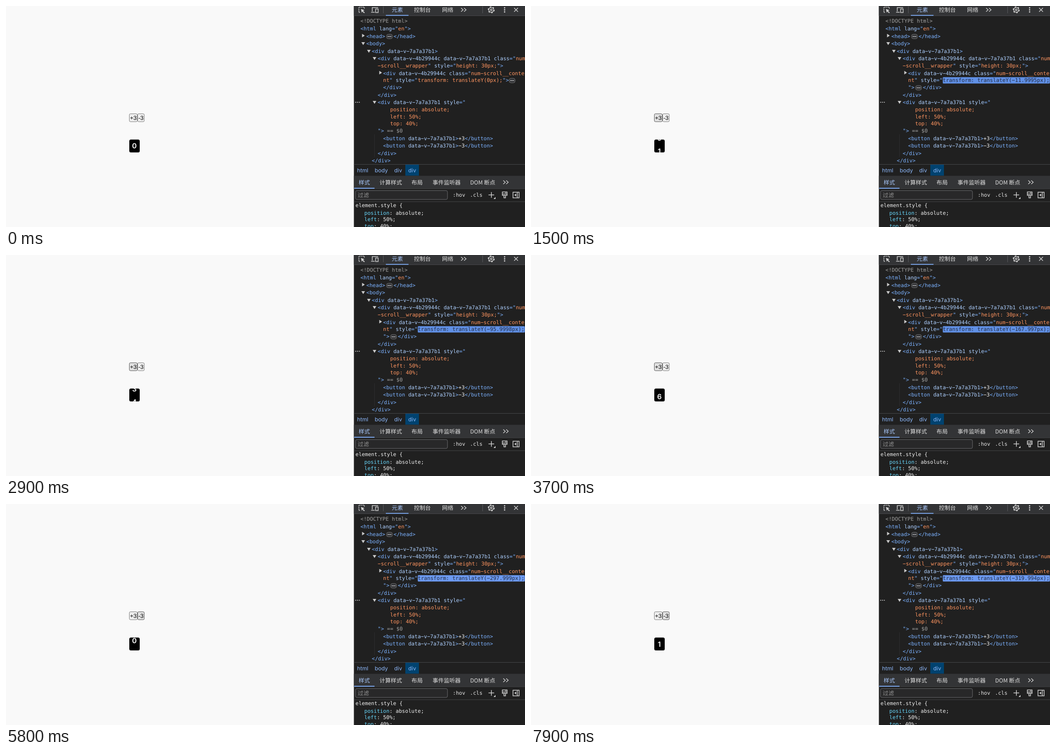
Animation, 1145 px wide and 489 px high, one loop 8 s. Source, as an HTML page:

```html
<!DOCTYPE html>
<html lang="en">
<head>
<meta charset="utf-8">
<title>Number scroll</title>
<style>
html, body { margin: 0; width: 100%; height: 100%; overflow: hidden; background: #f9f9f9; }
svg { display: block; width: 1145px; height: 489px; }
text { white-space: pre; text-rendering: geometricPrecision; }
.mono { font: 11.51px "DejaVu Sans Mono", monospace; }
.cjk { font: 12.4px "Noto Sans CJK SC", "Noto Sans CJK", sans-serif; }
.ui { font: 12.2px Inter, sans-serif; }
.btn { font: 12.9px "Liberation Sans", Arial, sans-serif; text-anchor: middle; }
.num { font: 600 15.8px Inter, sans-serif; text-anchor: middle; fill: #fff; }
</style>
</head>
<body>
<svg id="stage" viewBox="0 0 1145 489" xmlns="http://www.w3.org/2000/svg">
  <defs><clipPath id="clip"><rect x="272" y="295.5" width="23" height="28.6" rx="3.5"/></clipPath></defs>
</svg>
<script>
const stage = document.getElementById("stage");
const COLORS = { t: "#7cb2ff", a: "#aed0ff", v: "#ff9560", w: "#f0f0f0", g: "#a2a2a2", c: "#68d6fa" };
const CHAR = 6.93;

function el(name, attrs = {}, parent = stage) {
  const node = document.createElementNS("http://www.w3.org/2000/svg", name);
  set(node, attrs);
  parent.appendChild(node);
  return node;
}
function set(node, attrs) {
  for (const key in attrs) node.setAttribute(key, attrs[key]);
}
const rect = (x, y, width, height, fill, more) => el("rect", { x, y, width, height, fill, ...more });
const path = (d, stroke = "#d0d0d0", more) =>
  el("path", { d, stroke, fill: "none", "stroke-width": 1.5, ...more });
function label(x, y, str, cls, fill, more) {
  const node = el("text", { x, y, class: cls, fill, ...more });
  node.textContent = str;
  return node;
}
// Coloured code line: "{t<div }{aname}" where the first letter picks the colour; hyphens are drawn wide
function code(x, y, src) {
  const node = el("text", { x, y: y + 4, class: "mono" });
  for (const [, key, str] of src.matchAll(/\{(\w)([^}]*)\}/g))
    el("tspan", { fill: COLORS[key] }, node).textContent = str.replace(/-/g, "−");
  return node;
}
function badge(x, y) {
  const g = el("g", { transform: `translate(${x} ${y})` });
  el("rect", { x: -6.5, y: -4.5, width: 13, height: 10, rx: 4, fill: "#303134", stroke: "#8a8a8a", "stroke-width": .8 }, g);
  for (const dx of [-3, 0, 3]) el("circle", { cx: dx, cy: .5, r: 1.1, fill: "#e3e3e3" }, g);
  return g;
}
const arrow = (x, y, open) =>
  path(open ? `M${x - 4} ${y - 3}h8l-4 6.5z` : `M${x - 2.5} ${y - 4.5}v8l6-4z`, "none", { fill: "#c8c8c8" });
const chevrons = (x, y) => path(`M${x - 6} ${y - 4}l4.5 4-4.5 4m6.5-8l4.5 4-4.5 4`);

// Page: buttons and number box
function button(x, w, str) {
  const box = rect(x + .5, 238.5, w - 1, 17.5, "#efefef", { rx: 2.3, stroke: "#767676" });
  label(x + w / 2, 251.7, str, "btn", "#000");
  return box;
}
const plus = button(271.7, 18.3, "+3");
const minus = button(290, 15.5, "-3");
rect(272, 295.5, 23, 28.6, "#000", { rx: 3.5 });
const reel = el("g", {}, el("g", { "clip-path": "url(#clip)" }));
const PITCH = 28.5;
for (let i = 0; i < 20; i++)
  el("text", { x: 283.2, y: 315.3 + i * PITCH, class: "num" }, reel).textContent = i % 10;

// Developer panel
rect(767.5, 0, 378, 489, "#202020");
rect(767.5, 0, 378, 21, "#333436");
rect(767.5, 21, 378, 1, "#47484b");
path("M781 14h-2.5v-11.5h12v4", "#d0d0d0", { "stroke-dasharray": "2.6 1.2" });
path("M783 6.5l8 2.8-3.2 1.5 3.7 3.7-1.5 1.5-3.7-3.7-1.4 2.8z", "none", { fill: "#d0d0d0" });
path("M808 12V3.5h13M805.5 13.7h8M815.5 6.5h5.5v8h-5.5z");
rect(832, 1, 1, 15, "#5a5b5e");
rect(1051, 1, 1, 15, "#5a5b5e");
label(851, 12.7, "元素", "cjk", "#a8c7fa");
label(900, 12.7, "控制台", "cjk", "#e0e0e0");
label(962, 12.7, "网络", "cjk", "#e0e0e0");
rect(838, 19.8, 50, 1.8, "#7cacf8");
chevrons(1010, 8.5);
el("circle", { cx: 1070.5, cy: 8.5, r: 6.6, fill: "none", stroke: "#d0d0d0", "stroke-width": 2, "stroke-dasharray": "3.4 3.5" });
el("circle", { cx: 1070.5, cy: 8.5, r: 5.4, fill: "none", stroke: "#d0d0d0", "stroke-width": 1.4 });
el("circle", { cx: 1070.5, cy: 8.5, r: 2, fill: "none", stroke: "#d0d0d0", "stroke-width": 1.4 });
for (const y of [4, 8.5, 13]) el("circle", { cx: 1100, cy: y, r: 1.5, fill: "#e0e0e0" });
path("M1121 4.3l8.5 8.5m0-8.5l-8.5 8.5");

code(782, 33, "{g<!DOCTYPE html>}");
code(782, 50, "{t<html }{alang}{t=\"}{ven}{t\">}");
arrow(788, 66);
code(795, 66.5, "{t<head>}");
badge(846, 67);
code(855, 66.5, "{t</head>}");
arrow(788, 83, true);
code(795, 83, "{t<body>}");
arrow(800.5, 100, true);
code(807, 100, "{t<div }{adata-v-7a7a37b1}{t>}");
arrow(813, 116, true);
code(820, 116, "{t<div }{adata-v-4b29944c data-v-7a7a37b1 class}{t=\"}{vnum}");
code(820, 132, "{v-scroll__wrapper}{t\" }{astyle}{t=\"}{vheight: 30px;}{t\">}");
arrow(826, 148);
code(832, 148.5, "{t<div }{adata-v-4b29944c class}{t=\"}{vnum-scroll__conte}");
code(832, 164, "{vnt}{t\" }{astyle}{t=\"}");
const flash = rect(908.5, 157.5, 10, 14, "#6092e8", { rx: 1.5 });
const value = label(908.5, 168, "", "mono", COLORS.v);
const quote = code(0, 164, "{t\">}");
const dots = badge(0, 0);
const close = code(832, 180, "{t</div>}");
code(820, 196.5, "{t</div>}");
for (const x of [771.5, 775.5, 779.5]) el("circle", { cx: x, cy: 213, r: 1.1, fill: "#d5d5d5" });
arrow(813, 213, true);
code(820, 213, "{t<div }{adata-v-7a7a37b1 style}{t=\"}");
code(847.5, 229, "{vposition: absolute;}");
code(847.5, 244.5, "{vleft: 50%;}");
code(847.5, 260, "{vtop: 40%;}");
code(820, 276, "{t\">}");
set(code(840.5, 276, "{g== $0}"), { "font-style": "italic" });
rect(812.5, 284, 1, 50, "#2e2f31");
code(832, 292.5, "{t<button }{adata-v-7a7a37b1}{t>}{w+3}{t</button>}");
code(832, 309, "{t<button }{adata-v-7a7a37b1}{t>}{w-3}{t</button>}");
code(820, 325.5, "{t</div>}");
code(807, 342, "{t</div>}");

rect(767.5, 350, 378, 1, "#47484b");
rect(881, 351, 30, 24.5, "#00426f");
for (const [x, str] of [[774.5, "html"], [813.5, "body"], [856.5, "div"], [887.5, "div"]])
  label(x, 367.5, str, "ui", "#8db8fa");
rect(767.5, 375.7, 378, 28, "#333436");
rect(767.5, 403.7, 378, 1, "#47484b");
for (const [x, str, fill] of [[778, "样式", "#a8c7fa"], [824, "计算样式"], [894.5, "布局"], [941, "事件监听器"], [1024, "DOM 断点"]])
  label(x, 394.5, str, "cjk", fill || "#e0e0e0");
rect(768, 402.3, 45, 1.9, "#7cacf8");
chevrons(1103, 390);
rect(771, 408.5, 203, 19.5, "#282829", { rx: 3, stroke: "#6c6d70" });
label(776, 422.5, "过滤", "cjk", "#959595");
label(985.5, 422, ":hov", "mono", "#e4e4e4", { "font-weight": "bold" });
label(1023.5, 422, ".cls", "mono", "#e4e4e4", { "font-weight": "bold" });
path("M1064.5 418h12.5m-6.2-6.2v12.5");
path("M1080 422.5v4.5h-4.5z", "none", { fill: "#d0d0d0" });
path("M1095 411.5h10.5v7.5h-10.5zM1095 416h10.5M1098.5 419.5v5h3.5v-5M1102.5 411.5v3");
path("M1118.5 412h13.5v12.5h-13.5zM1128 412v12.5");
path("M1125.5 415v6.5l-4-3.2z", "none", { fill: "#d0d0d0" });
rect(767.5, 432.5, 378, 1, "#47484b");
code(771, 441, "{welement.style {}");
code(790.5, 458, "{cposition}{w: absolute;}");
code(790.5, 472, "{cleft}{w: 50%;}");
code(790.5, 486.5, "{ctop}{w: 40%;}");

// Each run scrolls for one second in 30 steps; the panel shows every eighth step
const LOOP = 8000, SPAN = 1000, STEPS = 30, EVERY = 8, FADE = 1400;
const RUNS = [
  { at: 1300, from: 0, dist: 90, phase: 4 },
  { at: 2746, from: 90, dist: 90, phase: 2 },
  { at: 4178, from: 180, dist: 90, phase: 0 },
  { at: 5620, from: 270, dist: 210, phase: 4 },
  { at: 7187, from: 180, dist: 210, phase: 4 }
];
const clamp = x => Math.min(1, Math.max(0, x));
const mix = (a, b, k) => `rgb(${a.map((v, i) => Math.round(v + (b[i] - v) * k))})`;
const rest = run => (run.from + run.dist) % 300;

function panelState(t, index) {
  if (index < 0) return { str: "0", glow: 0 };
  const run = RUNS[index], age = t - run.at - SPAN;
  const bright = run.dist > 90;
  if (age >= 0) return { str: "−" + rest(run), glow: 1 - clamp((age - 200) / FADE), bright };
  const step = (t - run.at) / SPAN * STEPS;
  const shown = run.phase + EVERY * Math.floor((step - run.phase) / EVERY);
  if (shown <= 0) return panelState(t, index - 1);
  const drift = Math.min(.003, .000148 * shown - .00009) * (bright ? 2 : 1);
  const pos = run.from + run.dist * shown / STEPS - drift;
  return { str: "−" + pos.toPrecision(6), glow: 1, bright };
}

function draw(time) {
  const t = Math.floor(time % LOOP / 100) * 100;
  const index = RUNS.filter(run => run.at <= t).length - 1;
  const run = RUNS[index];
  let pos = 0;
  if (run) {
    const k = (t - run.at) / SPAN;
    pos = k < 1 ? run.from + run.dist * k : rest(run);
  }
  set(reel, { transform: `translate(0 ${-pos / 30 * PITCH})` });

  const { str, glow, bright } = panelState(t, index);
  const text = `transform: translateY(${str}px);`;
  const wide = text.length > 32, start = str === "0";
  const end = 908.5 + text.length * CHAR;
  value.textContent = text;
  set(value, { fill: mix([255, 149, 96], [36, 44, 66], glow) });
  set(flash, { width: end - 908, opacity: glow, fill: bright ? "#6c9af2" : "#6090e6" });
  set(quote, { x: wide ? 832 : end, y: wide ? 184 : 168 });
  const bx = start ? end + 21 : wide ? 855 : 841.5;
  set(dots, { transform: `translate(${bx} ${start ? 164.5 : 180.5})` });
  set(close, { x: start ? 832 : bx + 9.5 });

  const hover = (node, on) => set(node, { fill: on ? "#e2e2e2" : "#efefef", stroke: on ? "#4f4f4f" : "#767676" });
  hover(plus, t >= 700 && t < 5300);
  hover(minus, t >= 5400);
}

const begin = performance.now();
function tick() {
  draw(performance.now() - begin);
  requestAnimationFrame(tick);
}
tick();
</script>
</body>
</html>
```
